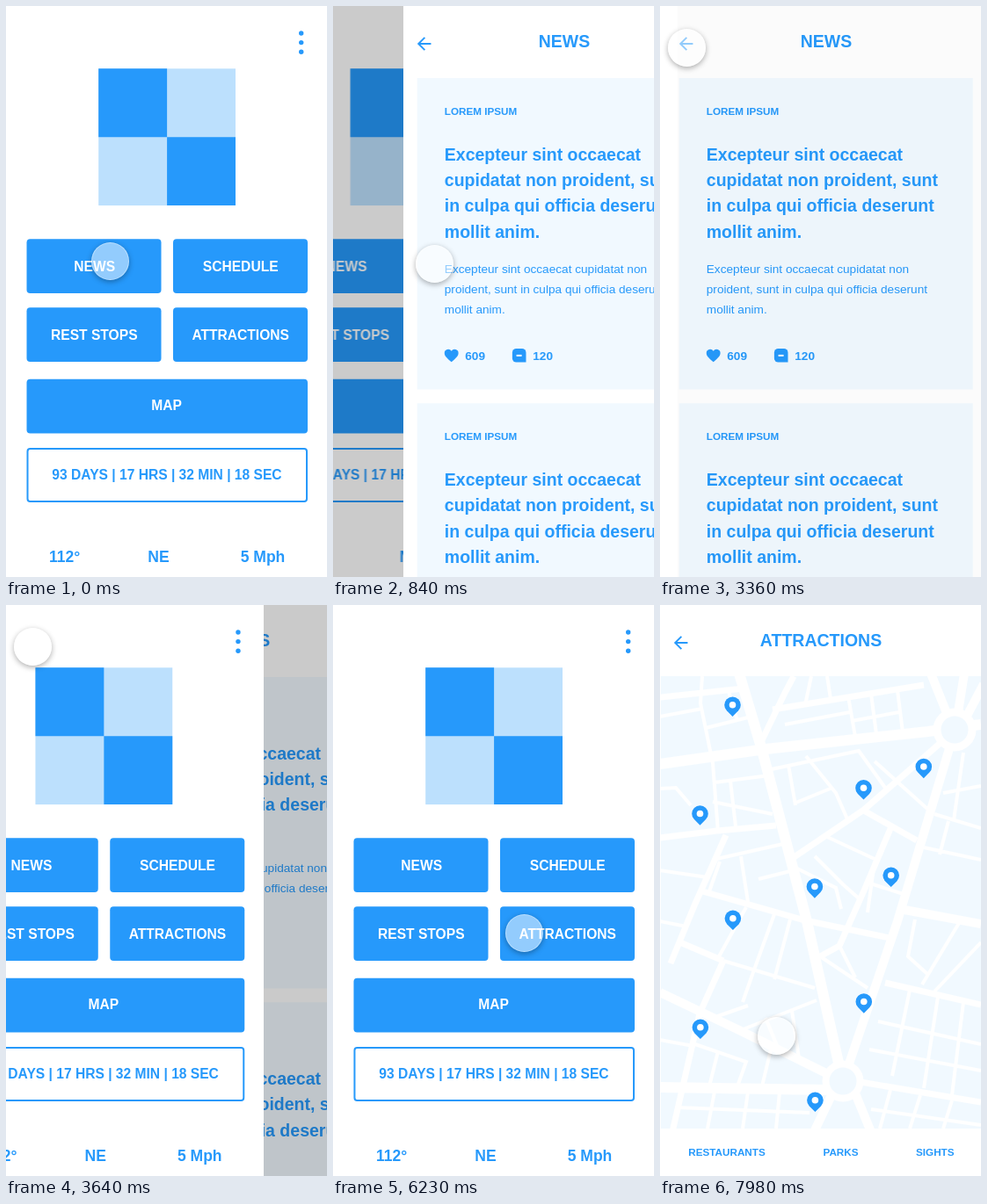
Write an HTML page that moves like this. It is 365 px wide and 650 px high and loops after 8000 ms.

```html
<!DOCTYPE html>
<html lang="en">
<head>
<meta charset="utf-8">
<title>Travel app prototype</title>
<style>
  :root {
    --blue: #2699fb;
    --sky: #bce0fd;
    --pale: #f1f9ff;
  }
  html, body { margin: 0; width: 100%; height: 100%; overflow: hidden; background: #fff; }
  .stage { position: relative; width: 365px; height: 650px; overflow: hidden; }
  .page { position: absolute; inset: 0; overflow: hidden; background: #fff; animation: 8s linear infinite; }
  .page svg { display: block; }
  .dim { position: absolute; inset: 0; background: #000; opacity: 0; animation: 8s linear infinite; }

  text { font-family: "Liberation Sans", Arial, sans-serif; font-weight: 700; fill: var(--blue); }
  .mid { text-anchor: middle; }
  .s12 { font-size: 11.7px; }
  .s14 { font-size: 13.63px; }
  .s16 { font-size: 15.6px; }
  .s18 { font-size: 17.52px; }
  .s20 { font-size: 19.5px; }
  .thin { font-weight: 400; }
  .on text { fill: #fff; }
  .blue { fill: var(--blue); }
  .sky { fill: var(--sky); }
  .pale { fill: var(--pale); }
  .roads { fill: none; stroke: #fff; }

  #home { animation: home 8s linear infinite, lift 8s step-end infinite; }
  #news { z-index: 1; animation-name: news; }
  #sights { z-index: 3; animation-name: sights; }
  #home .dim { animation-name: homeDim; }
  #news .dim { animation-name: newsDim; }

  /* Pages slide for 700 ms with a cubic ease-out; the page below moves 30% as far. */
  @keyframes lift {
    0% { z-index: 0; }
    41.85%, 100% { z-index: 2; }
  }
  @keyframes home {
    0% { transform: translateX(0); }
    7.0375% { transform: translateX(0); animation-timing-function: cubic-bezier(.3333, 1, .6667, 1); }
    15.7875%, 41.849% { transform: translateX(-30%); }
    41.85% { transform: translateX(-100%); animation-timing-function: cubic-bezier(.3333, 1, .6667, 1); }
    50.6% { transform: translateX(0); }
    80.5875% { transform: translateX(0); animation-timing-function: cubic-bezier(.3333, 1, .6667, 1); }
    89.3375%, 100% { transform: translateX(-30%); }
  }
  @keyframes homeDim {
    0% { opacity: 0; }
    7.0375% { opacity: 0; animation-timing-function: cubic-bezier(.3333, 1, .6667, 1); }
    15.7875%, 41.849% { opacity: .26; }
    41.85% { opacity: 0; }
    80.5875% { opacity: 0; animation-timing-function: cubic-bezier(.3333, 1, .6667, 1); }
    89.3375%, 100% { opacity: .26; }
  }
  @keyframes news {
    0% { transform: translateX(100%); }
    7.0375% { transform: translateX(100%); animation-timing-function: cubic-bezier(.3333, 1, .6667, 1); }
    15.7875% { transform: translateX(0); }
    41.85% { transform: translateX(0); animation-timing-function: cubic-bezier(.3333, 1, .6667, 1); }
    50.6%, 100% { transform: translateX(30%); }
  }
  @keyframes newsDim {
    0% { opacity: 0; }
    41.85% { opacity: 0; animation-timing-function: cubic-bezier(.3333, 1, .6667, 1); }
    50.6%, 100% { opacity: .26; }
  }
  @keyframes sights {
    0% { transform: translateX(100%); }
    80.5875% { transform: translateX(100%); animation-timing-function: cubic-bezier(.3333, 1, .6667, 1); }
    89.3375%, 100% { transform: translateX(0); }
  }

  .touch {
    position: absolute; z-index: 9; left: -21.5px; top: -21.5px; width: 43px; height: 43px;
    box-sizing: border-box; border: 1px solid rgba(255, 255, 255, .35); border-radius: 50%;
    background: rgba(255, 255, 255, .5); box-shadow: 0 2px 6px rgba(0, 0, 0, .32);
    animation: touch 8s linear infinite;
  }
  @keyframes touch {
    0% { transform: translate(118px, 290px); }
    10.5% { transform: translate(115px, 293px); }
    16.875% { transform: translate(115px, 293px); animation-timing-function: cubic-bezier(.3333, 0, .6667, 1); }
    30.625% { transform: translate(43px, 50px); animation-timing-function: cubic-bezier(.3333, 1, .6667, 1); }
    34.375% { transform: translate(30px, 47px); }
    51.25% { transform: translate(30px, 47px); animation-timing-function: cubic-bezier(.3333, 0, .6667, 1); }
    67.875% { transform: translate(217px, 373px); }
    98% { transform: translate(217px, 373px); }
    99.75%, 100% { transform: translate(132px, 490px); }
  }
</style>
</head>
<body>
<div class="stage">

  <section class="page" id="home">
    <svg width="365" height="650" viewBox="0 0 365 650">
      <rect class="sky" x="105.2" y="71.3" width="155.8" height="155.8"/>
      <path class="blue" d="M105.2 71.3h77.9v155.8h77.9v-77.9h-155.8z"/>
      <g class="blue">
        <circle cx="335.7" cy="31" r="2.7"/>
        <circle cx="335.7" cy="41.6" r="2.7"/>
        <circle cx="335.7" cy="52.2" r="2.7"/>
        <rect x="23.5" y="265.2" width="153" height="61.8" rx="4"/>
        <rect x="190" y="265.2" width="153" height="61.8" rx="4"/>
        <rect x="23.5" y="343.2" width="153" height="61.8" rx="4"/>
        <rect x="190" y="343.2" width="153" height="61.8" rx="4"/>
        <rect x="23.5" y="424.8" width="319.5" height="61.8" rx="4"/>
      </g>
      <rect x="24.5" y="504" width="317.5" height="60" rx="3" fill="#fff" stroke="#2699fb" stroke-width="2"/>
      <g class="on mid s16">
        <text x="100.7" y="301.6">NEWS</text>
        <text x="266.7" y="301.6">SCHEDULE</text>
        <text x="100.3" y="379.6">REST STOPS</text>
        <text x="266.7" y="379.6">ATTRACTIONS</text>
        <text x="182.7" y="459.6">MAP</text>
      </g>
      <text class="mid s16" x="183" y="539.4">93 DAYS | 17 HRS | 32 MIN | 18 SEC</text>
      <g class="mid s18">
        <text x="66.6" y="633">112°</text>
        <text x="173.5" y="633">NE</text>
        <text x="292" y="633">5 Mph</text>
      </g>
    </svg>
    <div class="dim"></div>
  </section>

  <section class="page" id="news">
    <svg width="365" height="650" viewBox="0 0 365 650">
      <defs>
        <path id="back" class="blue" transform="translate(12 31.3) scale(.973)"
          d="M20 11H7.83l5.59-5.59L12 4l-8 8 8 8 1.41-1.41L7.83 13H20z"/>
        <g id="card">
          <rect class="pale" x="15.7" y="82" width="334" height="354.5"/>
          <text class="s12" x="46.8" y="124.2">LOREM IPSUM</text>
          <g class="s20">
            <text x="46.8" y="175.9">Excepteur sint occaecat</text>
            <text x="46.8" y="205.1">cupidatat non proident, sunt</text>
            <text x="46.8" y="234.3">in culpa qui officia deserunt</text>
            <text x="46.8" y="263.5">mollit anim.</text>
          </g>
          <g class="s14">
            <text class="thin" x="46.8" y="303.5">Excepteur sint occaecat cupidatat non</text>
            <text class="thin" x="46.8" y="326.9">proident, sunt in culpa qui officia deserunt</text>
            <text class="thin" x="46.8" y="350.2">mollit anim.</text>
            <text x="70.3" y="402.9">609</text>
            <text x="147.3" y="402.9">120</text>
          </g>
          <path class="blue" d="M54.7 405.3l-1.2-1C49.4 400.6 46.8 398.3 46.8 395.3a4.3 4.3 0 0 1 7.9-2.6a4.3 4.3 0 0 1 7.9 2.6c0 3-2.6 5.3-6.7 9z"/>
          <path class="blue" d="M128.4 390h6.6a4.5 4.5 0 0 1 4.5 4.5v11h-11.1a4.5 4.5 0 0 1-4.5-4.5v-6.5a4.5 4.5 0 0 1 4.5-4.5z"/>
          <rect x="128.6" y="396.9" width="6" height="2" fill="#fff"/>
        </g>
      </defs>
      <use href="#back"/>
      <text class="mid s20" x="183" y="47.3">NEWS</text>
      <use href="#card"/>
      <use href="#card" y="370.3"/>
    </svg>
    <div class="dim"></div>
  </section>

  <section class="page" id="sights">
    <svg width="365" height="650" viewBox="0 0 365 650">
      <defs>
        <clipPath id="area"><rect x="1" y="81" width="364" height="515"/></clipPath>
        <g id="pin">
          <path class="blue" d="M0 13.2L-6.6 6.6A9.3 9.3 0 1 1 6.6 6.6z"/>
          <circle r="3.8" fill="#fff"/>
        </g>
      </defs>
      <use href="#back"/>
      <text class="mid s20" x="183" y="47.3">ATTRACTIONS</text>
      <g clip-path="url(#area)">
        <rect class="pale" x="1" y="81" width="364" height="515"/>
        <!-- avenues -->
        <path class="roads" stroke-width="12" d="M0 181L120 164 305 144 365 136M90 78L116 165 167 360 205 530M0 549L190 552"/>
        <path class="roads" stroke-width="10" d="M330 160L270 360 214 525M0 441L90 484 195 536M278 347L365 363M308 78L328 128M346 78L339 122M368 90L348 128M222 556L240 600M196 556L175 600"/>
        <!-- streets -->
        <path class="roads" stroke-width="7" d="M320 156L232 233 145 292M0 265L65 257 132 251M45 325L165 359 266 380M0 105L95 95M114 158L142 100 152 81M128 119L300 91M228 543L365 566M256 430L365 455M230 233L292 268M75 262L40 340 12 408M25 385L72 405M72 405L45 465 14 600M264 250L232 325 204 388 182 400"/>
        <!-- lanes, upper part -->
        <path class="roads" stroke-width="4" d="M48 81L46 112 60 180 66 258M0 127L48 118M52 140L104 127M78 98L88 132M0 209L18 208 35 228M62 202L124 194M80 200L86 252M60 224L128 238M165 114L172 81M194 107L190 81M214 104L222 150M240 101L246 147M270 97L276 145M142 136L216 122M218 132L272 122M122 188L226 166 256 208M146 182L154 228M166 172L200 214 214 246M152 226L196 208M244 178L304 232M322 214L365 206M312 238L365 254M345 168L334 245M300 276L365 290M328 246L318 284"/>
        <!-- lanes, middle -->
        <path class="roads" stroke-width="4" d="M152 298L200 322 206 346M176 286L208 318 226 334M190 264L246 290M236 316L280 330M244 292L236 350M60 290L140 272M68 292L56 326M92 286L100 338M112 312L152 302M0 302L54 310M0 360L30 366M98 344L66 402M130 352L106 418M72 405L176 436M106 418L94 452M148 358L130 426M204 388L222 424M182 400L236 436M340 362L298 432M365 384L312 440M290 358L282 400 304 420"/>
        <!-- lanes, lower part -->
        <path class="roads" stroke-width="4" d="M92 484L178 450M120 470L134 504M150 462L158 516M60 470L100 456M40 500L98 520 88 548M66 508L56 548M126 506L116 548M0 495L38 502M20 572L170 578M62 554L54 596M100 554L94 596M136 554L132 596M284 438L264 536M316 446L300 550M345 452L332 558M248 474L365 500M238 506L365 530M262 552L250 596M296 558L284 596M332 564L322 596M240 574L365 592"/>
        <circle cx="335" cy="142" r="20" fill="#f1f9ff" stroke="#fff" stroke-width="9"/>
        <circle cx="208" cy="542" r="19.5" fill="#f1f9ff" stroke="#fff" stroke-width="8"/>
      </g>
      <use href="#pin" x="82.5" y="113.7"/>
      <use href="#pin" x="45.5" y="237.5"/>
      <use href="#pin" x="231.5" y="208.3"/>
      <use href="#pin" x="299.8" y="184"/>
      <use href="#pin" x="262.7" y="307.8"/>
      <use href="#pin" x="175.9" y="320.5"/>
      <use href="#pin" x="82.9" y="356.8"/>
      <use href="#pin" x="231.8" y="451.5"/>
      <use href="#pin" x="45.9" y="480.8"/>
      <use href="#pin" x="176.4" y="563.8"/>
      <g class="mid s12">
        <text x="76" y="626.8">RESTAURANTS</text>
        <text x="205.5" y="626.8">PARKS</text>
        <text x="312.8" y="626.8">SIGHTS</text>
      </g>
    </svg>
  </section>

  <div class="touch"></div>
</div>
</body>
</html>
```
